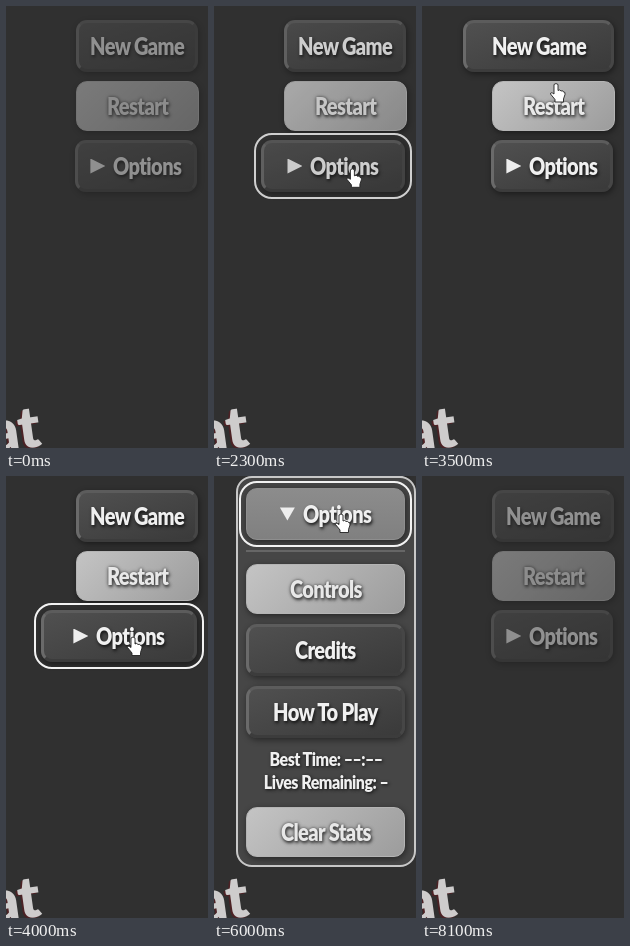
These frames come from a looping animation (202 by 442 pixels, 8200 ms). An HTML page:

```html
<!DOCTYPE html>
<html lang="en">
<head>
<meta charset="utf-8">
<title>Game menu</title>
<style>
  html, body { margin: 0; width: 100%; height: 100%; overflow: hidden; background: #303030; }
  #stage {
    position: relative; width: 202px; height: 442px; overflow: hidden;
    background: #303030; color: #f0f0f0;
    font: 900 20px/1 Lato, "Open Sans", sans-serif; letter-spacing: -.6px;
  }
  #menu, #panel, .btn, .stat, #rule, #title, #cursor { position: absolute; }
  #menu { inset: 0; }
  .btn {
    box-sizing: border-box; height: 52px; border-radius: 11px;
    border: 3px solid; border-color: #5c5c5c #464646 #3c3c3c #6a6a6a;
    background: linear-gradient(160deg, #505050, #3a3a3a);
    box-shadow: 1px 2px 6px rgba(0, 0, 0, .45);
    display: flex; align-items: center; justify-content: center; gap: 8px;
    white-space: nowrap;
  }
  .btn span, .stat { transform: scaleY(1.18); text-shadow: 1px 1px 3px #111; }
  .light {
    height: 50px; border: 1px solid #b4b4b4;
    background: linear-gradient(135deg, #c4c4c4, #9c9c9c);
  }
  .light span { color: #e8e8e8; text-shadow: 0 0 3px #444, 1px 1px 3px #333; }
  .hot { outline: 2px solid #f2f2f2; outline-offset: 5px; }
  .btn i {
    width: 15px; height: 15px; background: #eee;
    clip-path: polygon(0 0, 100% 50%, 0 100%);
  }
  .open { background: linear-gradient(#8c8c8c, #808080); border: 1px solid #8e8e8e; }
  .open i { clip-path: polygon(0 6%, 100% 6%, 50% 94%); }
  #panel {
    box-sizing: border-box; left: 22px; top: 122px; width: 180px; height: 391px;
    border: 2px solid #c8c8c8; border-radius: 16px; background: #464646;
  }
  #rule { left: 32px; top: 196px; width: 159px; height: 2px; background: #666; }
  .stat {
    left: 22px; width: 180px; text-align: center; white-space: nowrap;
    font-size: 16px; letter-spacing: -.5px;
  }
  #title { left: 0; top: 378px; }
  #cursor { left: 0; top: 0; overflow: visible; fill: #fff; stroke: #222; stroke-linejoin: round; }
</style>
</head>
<body>
<div id="stage">
  <svg id="title" width="60" height="64" font-family="Lato, sans-serif" font-weight="900" font-size="58" text-anchor="end">
    <g transform="translate(36 62) rotate(-8)">
      <text x="-2" y="1" fill="#4c2225">at</text>
      <text fill="#cecccc">at</text>
    </g>
  </svg>
  <div id="menu">
    <div class="btn" id="new" style="left:70px;right:10px;top:14px"><span>New Game</span></div>
    <div class="btn light" id="restart" style="left:70px;right:9px;top:75px"><span>Restart</span></div>
    <div id="extra">
      <div id="panel"></div>
      <div id="rule"></div>
      <div class="btn light" id="controls" style="left:32px;right:11px;top:210px"><span>Controls</span></div>
      <div class="btn" id="credits" style="left:32px;right:11px;top:270px"><span>Credits</span></div>
      <div class="btn" id="how" style="left:32px;right:11px;top:332px"><span>How To Play</span></div>
      <div class="stat" style="top:397px">Best Time: &ndash;&ndash;:&ndash;&ndash;</div>
      <div class="stat" style="top:420px">Lives Remaining: &ndash;</div>
      <div class="btn light" id="clear" style="left:32px;right:11px;top:453px"><span>Clear Stats</span></div>
    </div>
    <div class="btn" id="options" style="left:69px;right:11px;top:134px"><i></i><span>Options</span></div>
  </div>
  <svg id="cursor" width="20" height="22">
    <path id="arrow" d="M0 0V12L3 9.5L5 14L7 13L5 8.8H9Z" stroke-width=".8"/>
    <path id="hand" d="M-2 1Q0-1 2 1V7Q4 5.500 5 7.500Q7 6.500 7.500 8.500Q9.500 8 9 11L7.500 15.500V18.500H-1V16L-5.500 10.500Q-5.500 8-2 10.500Z" stroke-width=".9"/>
  </svg>
</div>
<script>
const LOOP = 8200, STEP = 100, GROW = 34;
const OPEN = 4200, CLOSE = 6700;
const $ = id => document.getElementById(id);
const easeOut = p => {
  p = Math.min(1, Math.max(0, p));
  return p * (2 - p);
};

// time, x, y of the pointer tip
const path = [
  [800, 116, 450], [1300, 125, 385], [1700, 133, 300], [2200, 138, 188],
  [2450, 139, 125], [2700, 139, 58], [3100, 136, 45], [3400, 136, 45],
  [3600, 132, 110], [4000, 127, 161], [4200, 127, 164], [5400, 127, 164],
  [5700, 127, 38], [6700, 127, 38], [6900, 127, 120], [7000, 127, 196],
  [7400, 122, 455]
];

// pointer over an enabled button: id, start, end
const hovers = [
  ["options", 2200, 2420], ["new", 2620, 3480], ["options", 3640, 4350],
  ["credits", 4500, 5500], ["options", 5600, CLOSE], ["options", 6865, 7000]
];

const growing = { new: 70, options: 69 };

function pointAt(t) {
  const i = path.findIndex(k => k[0] > t);
  if (i < 1) return path[0].slice(1);
  const [a, b] = [path[i - 1], path[i]];
  const p = (t - a[0]) / (b[0] - a[0]);
  return [1, 2].map(n => a[n] + (b[n] - a[n]) * p);
}

function growth(id, t) {
  const parts = hovers.filter(h => h[0] === id && t >= h[1]).map(([, a, b]) =>
    easeOut((Math.min(t, b) - a) / 250) * (1 - easeOut((t - b) / 250)));
  return Math.max(0, ...parts);
}

function draw(t) {
  const open = t >= OPEN && t < CLOSE;
  const inside = t >= 2200 && t < 7000;
  const lit = easeOut((t - 2200) / 250) - easeOut((t - 7000) / 350);
  const scroll = easeOut((t - 4250) / 420) - easeOut((t - CLOSE) / 440);

  $("menu").style.opacity = .5 + .5 * lit;
  $("menu").style.transform = `translateY(${-122 * scroll}px)`;
  $("extra").style.display = open ? "block" : "none";
  $("options").classList.toggle("open", open);

  for (const id in growing) $(id).style.left = growing[id] - GROW * growth(id, t) + "px";
  if (open) $("options").style.left = "32px";

  const hover = hovers.find(h => t >= h[1] && t < h[2]);
  document.querySelectorAll(".btn").forEach(b =>
    b.classList.toggle("hot", !!hover && hover[0] === b.id));

  const [x, y] = pointAt(t);
  $("cursor").style.display = t >= 900 && t < 7400 ? "block" : "none";
  $("cursor").style.transform = `translate(${x}px, ${y}px)`;
  $("arrow").style.display = inside ? "none" : "inline";
  $("hand").style.display = inside ? "inline" : "none";
}

const start = performance.now();
function tick() {
  const t = (performance.now() - start) % LOOP;
  draw(Math.floor(t / STEP) * STEP);
  requestAnimationFrame(tick);
}
tick();
</script>
</body>
</html>
```
